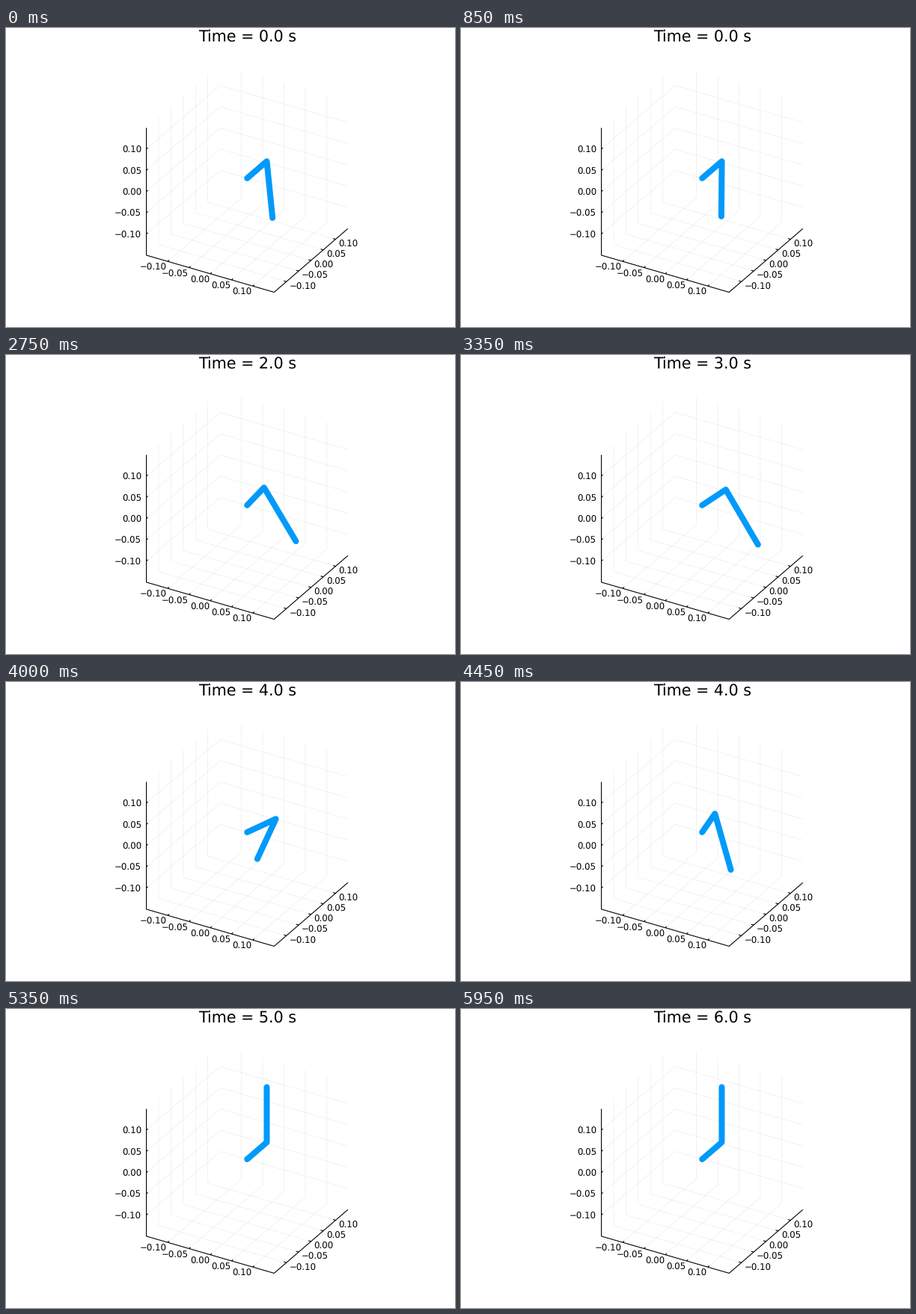
Recreate the animation shown at these times as a matplotlib script. Size 600 by 400 pixels, loop 6 s.

```python
import numpy as np
import matplotlib.pyplot as plt
from matplotlib.animation import FuncAnimation

W, H, DPI = 600, 400, 100
FRAMES, STEP = 120, 50
ARM, ROD = 0.08, 0.13                  # link lengths
LIM = 0.15
TICKS = np.arange(-2, 3) * 0.05
REST, PUMP, FLIP, CATCH, UPRIGHT = 25, 28, 94.3, 105, 107   # phase starts, in frames

plt.rcParams["font.family"] = "DejaVu Sans"
plt.rcParams["text.hinting"] = "none"


def px(n):
    return n * 72 / DPI


def project(x, y, z):
    return (322.2 + 569 * x + 328.5 * y,
            201.0 + 165 * x - 283.5 * y - 568 * z)


# Half swings done by a frame; each one takes longer as the swing widens.
COUNT = np.linspace(-2, 12, 1401)
COUNT_AT = 35.4 + 6.1 * COUNT + 0.054 * np.maximum(COUNT, 0) ** 2.5


def half_swings(t):
    return np.interp(t, COUNT_AT, COUNT)


def width(n):
    return 0.235 * np.log1p(np.exp(n - 0.6))


def settle(t):
    return np.exp(-t / 8) if t < REST else 0


def rod_angle(t):
    if t < PUMP:
        return 0.104 * settle(t) * np.cos(np.pi * t / 6.2)
    if t < FLIP:
        n = half_swings(t)
        return -width(n) * np.cos(np.pi * n)
    s = min((t - FLIP) / (UPRIGHT - FLIP), 1)
    start = -width(8)
    return start + (np.pi - start) * s * s * (3 - 2 * s)


def arm_angle(t):
    if t < PUMP:
        return 0.02 * settle(t) * np.sin(np.pi * t / 6.2)
    n = half_swings(min(t, CATCH))
    angle = (0.095 + 0.024 * n) * np.sin(np.pi * n + 0.25) + 0.00022 * n ** 3 - 0.01
    late = max(t - CATCH, 0)
    return angle * np.exp(-late / 4) * np.cos(np.pi * late / 4)


def links(t):
    phi, alpha = arm_angle(t), rod_angle(t)
    s, c = np.sin(phi), np.cos(phi)
    side = ROD * np.sin(alpha)
    elbow = (ARM * s, ARM * c, 0)
    tip = (ARM * s + side * c, ARM * c - side * s, -ROD * np.cos(alpha))
    return np.array([project(0, 0, 0), project(*elbow), project(*tip)]).T


fig = plt.figure(figsize=(W / DPI, H / DPI), dpi=DPI, facecolor="white")
ax = fig.add_axes([0, 0, 1, 1])
ax.set_xlim(0, W)
ax.set_ylim(H, 0)
ax.axis("off")


def path(*points, **style):
    xs, ys = zip(*(project(*p) for p in points))
    ax.plot(xs, ys, **style)


def label(point, value, dx, dy, ha):
    x, y = project(*point)
    text = f"{value:.2f}".replace("-", "\u2212")
    ax.text(x + dx, y + dy, text, ha=ha, va="center_baseline",
            fontsize=px(11.8), color="black")


grid = dict(color="black", alpha=0.07, lw=px(0.7))
line = dict(color="black", lw=px(1.1), solid_capstyle="butt")
L, S = LIM, 0.006

for v in TICKS:
    path((v, -L, -L), (v, L, -L), (v, L, L), **grid)
    path((L, v, -L), (-L, v, -L), (-L, v, L), **grid)
    path((-L, -L, v), (-L, L, v), (L, L, v), **grid)

    path((v, -L, -L), (v, -L + S, -L), **line)
    path((L, v, -L), (L - S, v, -L), **line)
    path((-L, -L, v), (-L, -L + S, v), **line)

    label((v, -L, -L), v, -1, 7.5, "right")
    label((L, v, -L), v, 4, 5.5, "left")
    label((-L, -L, v), v, -6.5, 0.5, "right")

path((-L, -L, L), (-L, -L, -L), (L, -L, -L), (L, L, -L), **line)

title = ax.text(322.7, 19, "", ha="center", va="baseline",
                fontsize=px(20.6), color="black")
rods, = ax.plot([], [], color="#009afa", lw=px(8), solid_capstyle="round",
                solid_joinstyle="round")


def draw(i):
    rods.set_data(*links(i))
    title.set_text(f"Time = {(i + 1) // 20}.0 s")
    return rods, title


anim = FuncAnimation(fig, draw, frames=FRAMES, interval=STEP, repeat=True,
                     repeat_delay=0, blit=False)
plt.show()
```
